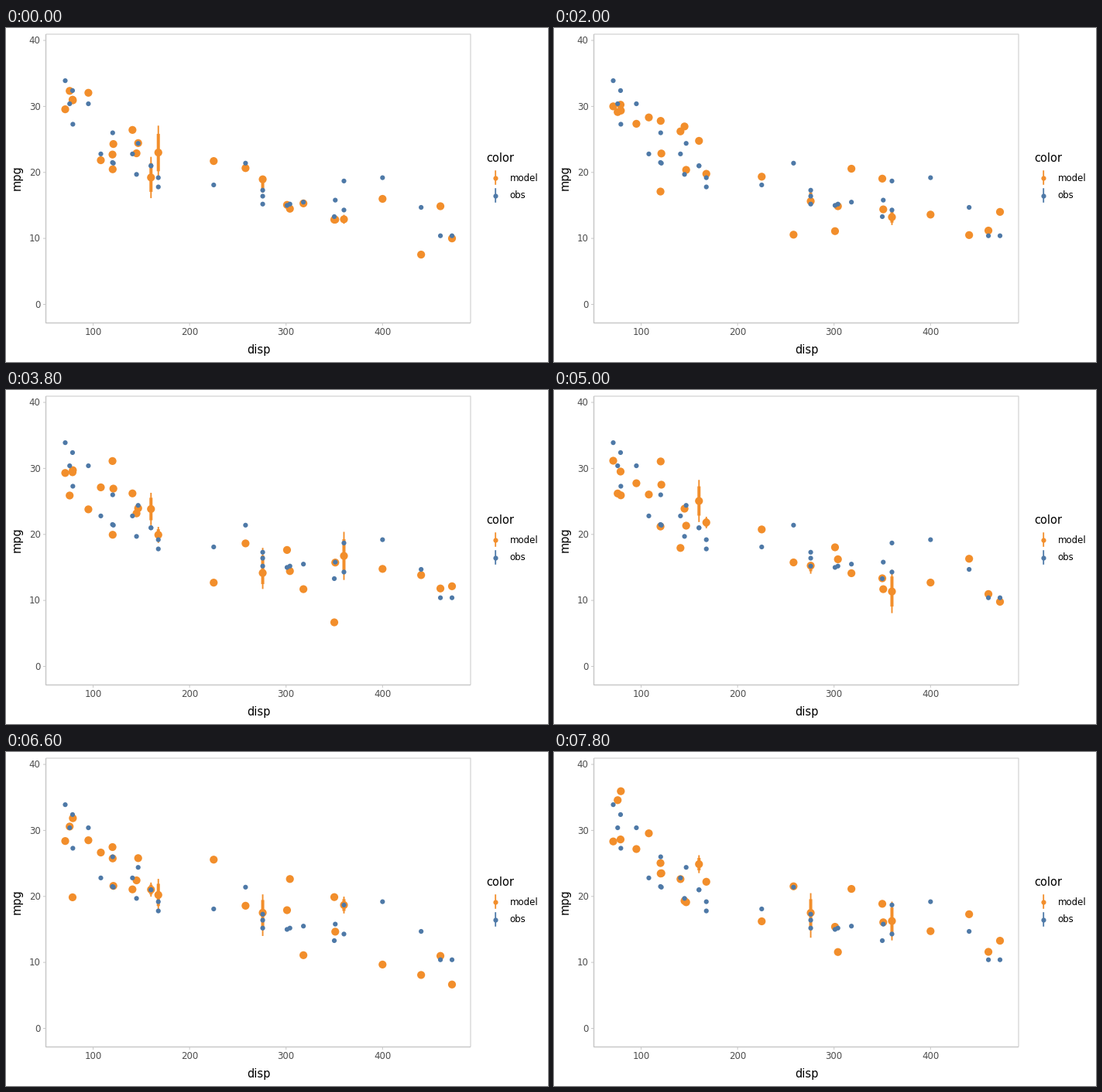
Write a matplotlib script that moves like this. It is 700 px wide and 432 px high and loops after 8000 ms.

```python
import numpy as np
import matplotlib.pyplot as plt
from matplotlib.animation import FuncAnimation
from matplotlib.collections import LineCollection

W, H, DPI = 700, 432, 100
FRAMES, STEP = 40, 200
ORANGE, BLUE = "#F28E2B", "#4E79A7"
AXIS_TEXT, TICK = "#4D4D4D", "#C8C8C8"
TITLE, SMALL = 14.67, 11.73

plt.rcParams["font.family"] = "DejaVu Sans"

# The mtcars data, ordered by displacement
DISP = np.array([
    71.1, 75.7, 78.7, 79, 95.1, 108, 120.1, 120.3, 121, 140.8, 145, 146.7,
    160, 160, 167.6, 167.6, 225, 258, 275.8, 275.8, 275.8, 301, 304, 318,
    350, 351, 360, 360, 400, 440, 460, 472])
MPG = np.array([
    33.9, 30.4, 32.4, 27.3, 30.4, 22.8, 21.5, 26, 21.4, 22.8, 19.7, 24.4,
    21, 21, 19.2, 17.8, 18.1, 21.4, 16.4, 17.3, 15.2, 15, 15.2, 15.5,
    13.3, 15.8, 18.7, 14.3, 19.2, 14.7, 10.4, 10.4])
GROUPS = np.unique(DISP)
LEVELS = [0.025, 0.17, 0.5, 0.83, 0.975]


def px(points):
    return points * 72 / DPI


def sx(disp):
    return 112.5 + (np.asarray(disp) - 100) * 1.246


def sy(mpg):
    return 357.5 - np.asarray(mpg) * 8.536


# One predictive draw per frame around a log-linear fit
rng = np.random.default_rng(12)
fit = 69.2 - 9.29 * np.log(DISP)
draws = np.clip(fit + rng.normal(0, 3.2, (FRAMES, len(DISP))), 6.1, 36)

fig = plt.figure(figsize=(W / DPI, H / DPI), dpi=DPI, facecolor="white")
ax = fig.add_axes([0, 0, 1, 1])
ax.set_xlim(0, W)
ax.set_ylim(H, 0)
ax.axis("off")


def line(xs, ys, color, width):
    ax.plot(xs, ys, color=color, lw=px(width), solid_capstyle="butt",
            solid_joinstyle="miter", snap=False)


def label(x, y, text, size, color="black", ha="center", va="baseline", **kw):
    ax.text(x, y, text, fontsize=px(size), color=color, ha=ha, va=va, **kw)


def dots(x, y, radius, color, z):
    # One size per dot keeps sub-pixel positions
    sizes = np.full(len(x), px(2 * radius) ** 2)
    return ax.scatter(x, y, s=sizes, c=color, linewidths=0, zorder=z)


def bars(width):
    coll = LineCollection([], colors=ORANGE, linewidths=px(width), zorder=3,
                          capstyle="butt", snap=False)
    return ax.add_collection(coll)


# Panel frame and axes
L, R, T, B = 51.5, 600, 8, 381.5
line([L, R, R], [T, T, B], "#D4D4D4", 1.3)
line([L, L, R], [T, B, B], "#C6C6C6", 1.4)
for v in (0, 10, 20, 30, 40):
    line([48, 51], [sy(v)] * 2, TICK, 1)
    label(44.7, sy(v) + 4.2, str(v), SMALL, AXIS_TEXT, "right")
for v in (100, 200, 300, 400):
    line([sx(v)] * 2, [382, 385], TICK, 1)
    label(sx(v), 397.3, str(v), SMALL, AXIS_TEXT)
label(326, 421, "disp", TITLE)
label(14, 194, "mpg", TITLE, va="center", rotation=90)

# Legend
label(620.5, 173, "color", TITLE, ha="left")
for y, name, color in ((193.5, "model", ORANGE), (216.5, "obs", BLUE)):
    line([632.2] * 2, [y - 9.3, y + 9.3], color, 1.8)
    dots([632.2], [y], 3.1, color, 4)
    label(650.5, y + 4, name, SMALL, ha="left")

thin, thick = bars(1.9), bars(4)
model = dots(sx(GROUPS), sy(GROUPS * 0), 5.1, ORANGE, 4)
dots(sx(DISP), sy(MPG), 3.1, BLUE, 5)


def spans(low, high):
    return [[(x, a), (x, b)] for x, a, b in zip(sx(GROUPS), sy(low), sy(high))]


def update(i):
    q = np.array([np.quantile(draws[i][DISP == d], LEVELS) for d in GROUPS]).T
    thin.set_segments(spans(q[0], q[4]))
    thick.set_segments(spans(q[1], q[3]))
    model.set_offsets(np.column_stack([sx(GROUPS), sy(q[2])]))
    return thin, thick, model


anim = FuncAnimation(fig, update, frames=FRAMES, interval=STEP, repeat=True,
                     init_func=lambda: update(0))
plt.show()
```
